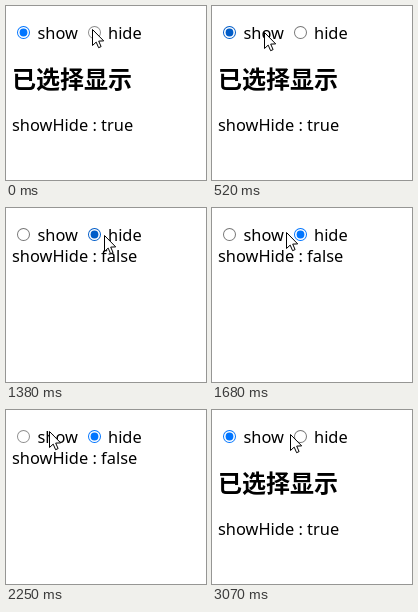
An HTML page with a canvas that plays this animation: 200 px wide and 174 px high, repeating every 3.2 s.

```html
<!DOCTYPE html>
<html lang="zh-CN">
<head>
<meta charset="utf-8">
<title>show / hide</title>
<style>
html, body { margin: 0; width: 100%; height: 100%; overflow: hidden; background: #fff; }
canvas { display: block; width: 200px; height: 174px; }
</style>
</head>
<body>
<canvas id="stage"></canvas>
<script>
const W = 200, H = 174, LOOP = 3200, STEP = 100;
const canvas = document.getElementById('stage');
const ctx = canvas.getContext('2d');
const ratio = window.devicePixelRatio || 1;
canvas.width = W * ratio;
canvas.height = H * ratio;

const BODY = '16.4px "Noto Sans", "Open Sans", sans-serif';
const HEAD = 'bold 24px "Noto Sans CJK SC", "Noto Sans CJK", sans-serif';

// Each click toggles between show and hide.
const clicks = [100, 420, 1280, 2270];

// Resting points of the pointer
const stops = [
  { t: 0, x: 86, y: 23 }, { t: 100, x: 86, y: 23 },
  { t: 400, x: 52, y: 26 }, { t: 620, x: 52, y: 26 },
  { t: 1120, x: 96, y: 26 }, { t: 1380, x: 98, y: 27 },
  { t: 2080, x: 43, y: 21 }, { t: 2270, x: 43, y: 21 },
  { t: 3070, x: 78, y: 24 }, { t: LOOP, x: 86, y: 23 }
];

function pointerAt(t) {
  const i = stops.findIndex(s => s.t > t);
  const a = stops[i - 1], b = stops[i];
  const k = (t - a.t) / (b.t - a.t);
  return [Math.round(a.x + (b.x - a.x) * k), Math.round(a.y + (b.y - a.y) * k)];
}

function text(str, x, y, font = BODY) {
  ctx.font = font;
  ctx.fillStyle = '#000';
  ctx.fillText(str, x, y);
}

function disc(x, y, r, color) {
  ctx.fillStyle = color;
  ctx.beginPath();
  ctx.arc(x, y, r, 0, Math.PI * 2);
  ctx.fill();
}

function radio(x, checked, hover, pressed) {
  const y = 26.5;
  const [idle, over, down] = checked
    ? ['#0075ff', '#005cc8', '#3793ff']
    : ['#767676', '#4f4f4f', '#8d8d8d'];
  const color = !hover ? idle : pressed ? down : over;
  disc(x, y, 6.5, color);
  disc(x, y, 5.5, '#fff');
  if (checked) disc(x, y, 3.9, color);
}

function pointer(x, y) {
  const shape = new Path2D('M0 0V16L3.7 12.6 6.1 18.2 8.6 17.1 6.2 11.6 11.2 11.4Z');
  ctx.translate(x + 0.5, y + 0.5);
  ctx.fillStyle = '#fff';
  ctx.fill(shape);
  ctx.strokeStyle = '#000';
  ctx.lineWidth = 1;
  ctx.stroke(shape);
}

function draw(now) {
  const time = now % LOOP;
  const done = clicks.filter(c => c <= time);
  const last = done.length ? done[done.length - 1] : 0;
  // The picture refreshes in even steps, counted from the last click.
  const t = last + Math.floor((time - last) / STEP) * STEP;
  const hidden = done.length % 2 === 1;
  const pressed = clicks.some(c => c > t && c - t <= STEP);
  const [x, y] = pointerAt(t);

  ctx.setTransform(ratio, 0, 0, ratio, 0, 0);
  ctx.fillStyle = '#fff';
  ctx.fillRect(0, 0, W, H);

  radio(17.5, !hidden, x >= 11 && x < 73, pressed);
  text('show', 31.5, 33);
  radio(88.5, hidden, x >= 82 && x < 136, pressed);
  text('hide', 102, 33);

  if (hidden) {
    text('showHide : false', 6, 54);
  } else {
    text('已选择显示', 6, 82, HEAD);
    text('showHide : true', 6, 125);
  }
  pointer(x, y);
}

function frame() {
  draw(performance.now());
  requestAnimationFrame(frame);
}
frame();
</script>
</body>
</html>
```
